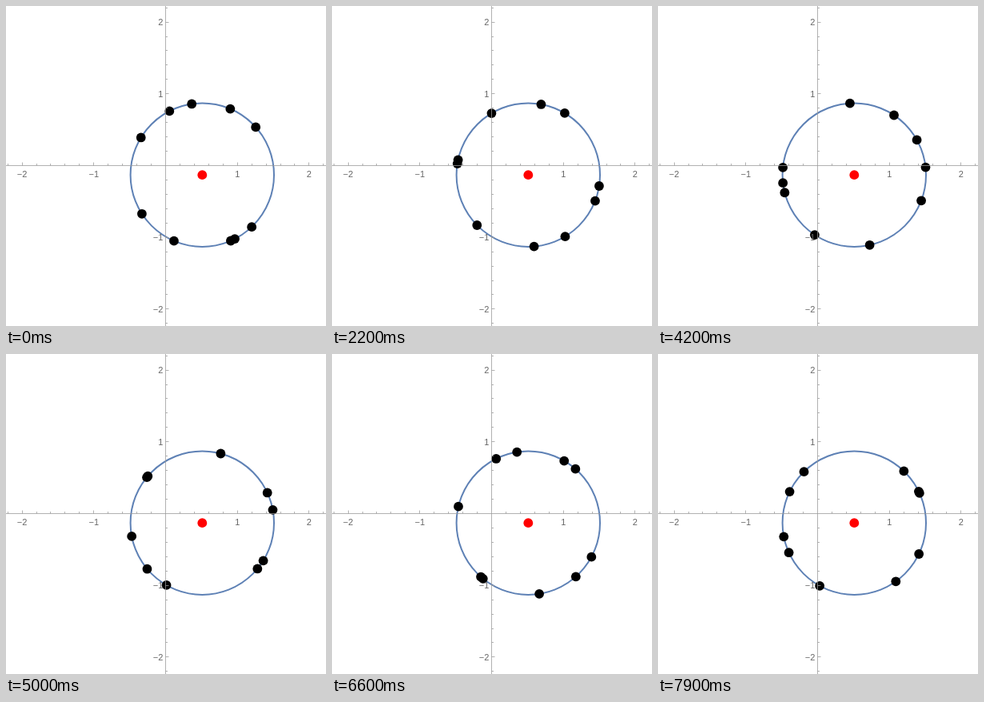
An HTML page for the animation above (8000 ms loop, 400 by 400 pixels).

```html
<!DOCTYPE html>
<html lang="en">
<head>
<meta charset="utf-8">
<title>Dots on a circle</title>
<style>
  html, body { margin: 0; width: 100%; height: 100%; overflow: hidden; background: #fff; }
  svg { display: block; width: 100vw; height: 100vh; }
  .axes { stroke: #999; stroke-opacity: .75; stroke-width: 1; fill: none; }
  text { font: 11px "Liberation Sans", Arial, sans-serif; fill: #666; }
</style>
</head>
<body>
<svg viewBox="0 0 400 400">
  <circle id="ring" fill="none" stroke="#5e81b5" stroke-width="2"/>
  <g id="dots"></g>
  <g id="axes" class="axes"></g>
  <g id="labels"></g>
</svg>
<script>
const ORIGIN = 199.5, UNIT = 89.7;
const CENTER = { x: 245.3, y: 211.2 };
const LOOP = 8000, STEP = 100;
const SPEED = 0.1; // radians per step

// [start angle in degrees, direction]
const DOTS = [
  [148.6, 1], [117.2, -1], [98.4, 1], [67, -1], [41.8, 1],
  [313.6, 1], [297, -1], [293.4, 1], [246.8, -1], [212.8, 1]
];

const byId = id => document.getElementById(id);

function add(parent, tag, attrs, text) {
  const el = document.createElementNS("http://www.w3.org/2000/svg", tag);
  for (const key in attrs) el.setAttribute(key, attrs[key]);
  if (text) el.textContent = text;
  parent.appendChild(el);
  return el;
}

function drawAxes() {
  let path = `M0 ${ORIGIN}H400M${ORIGIN} 0V400`;
  for (let i = -11; i <= 11; i++) {
    if (!i) continue;
    const offset = i * UNIT / 5;
    const size = i % 5 ? 2.5 : 4;
    const x = Math.floor(ORIGIN + offset) + 0.5;
    const y = Math.floor(ORIGIN - offset) + 0.5;
    path += `M${x} ${ORIGIN}v${-size}M${ORIGIN} ${y}h${size}`;
  }
  add(byId("axes"), "path", { d: path });

  for (const n of [-2, -1, 1, 2]) {
    const label = String(n).replace("-", "\u2212");
    add(byId("labels"), "text",
      { x: ORIGIN + n * UNIT, y: 213.5, "text-anchor": "middle" }, label);
    add(byId("labels"), "text",
      { x: 196.3, y: ORIGIN - n * UNIT + 4, "text-anchor": "end" }, label);
  }
}

const ring = byId("ring");
ring.setAttribute("cx", CENTER.x);
ring.setAttribute("cy", CENTER.y);
ring.setAttribute("r", UNIT);
drawAxes();

const group = byId("dots");
add(group, "circle", { cx: CENTER.x, cy: CENTER.y, r: 5.9, fill: "#f00" });
const dots = DOTS.map(([deg, dir]) => ({
  start: deg * Math.PI / 180,
  dir,
  el: add(group, "circle", { r: 5.9 })
}));

function render(time) {
  const step = Math.floor((time % LOOP) / STEP);
  for (const { start, dir, el } of dots) {
    const angle = start + dir * SPEED * step;
    el.setAttribute("cx", CENTER.x + UNIT * Math.cos(angle));
    el.setAttribute("cy", CENTER.y - UNIT * Math.sin(angle));
  }
}

const begin = performance.now();
function tick() {
  render(performance.now() - begin);
  requestAnimationFrame(tick);
}
tick();
</script>
</body>
</html>
```
